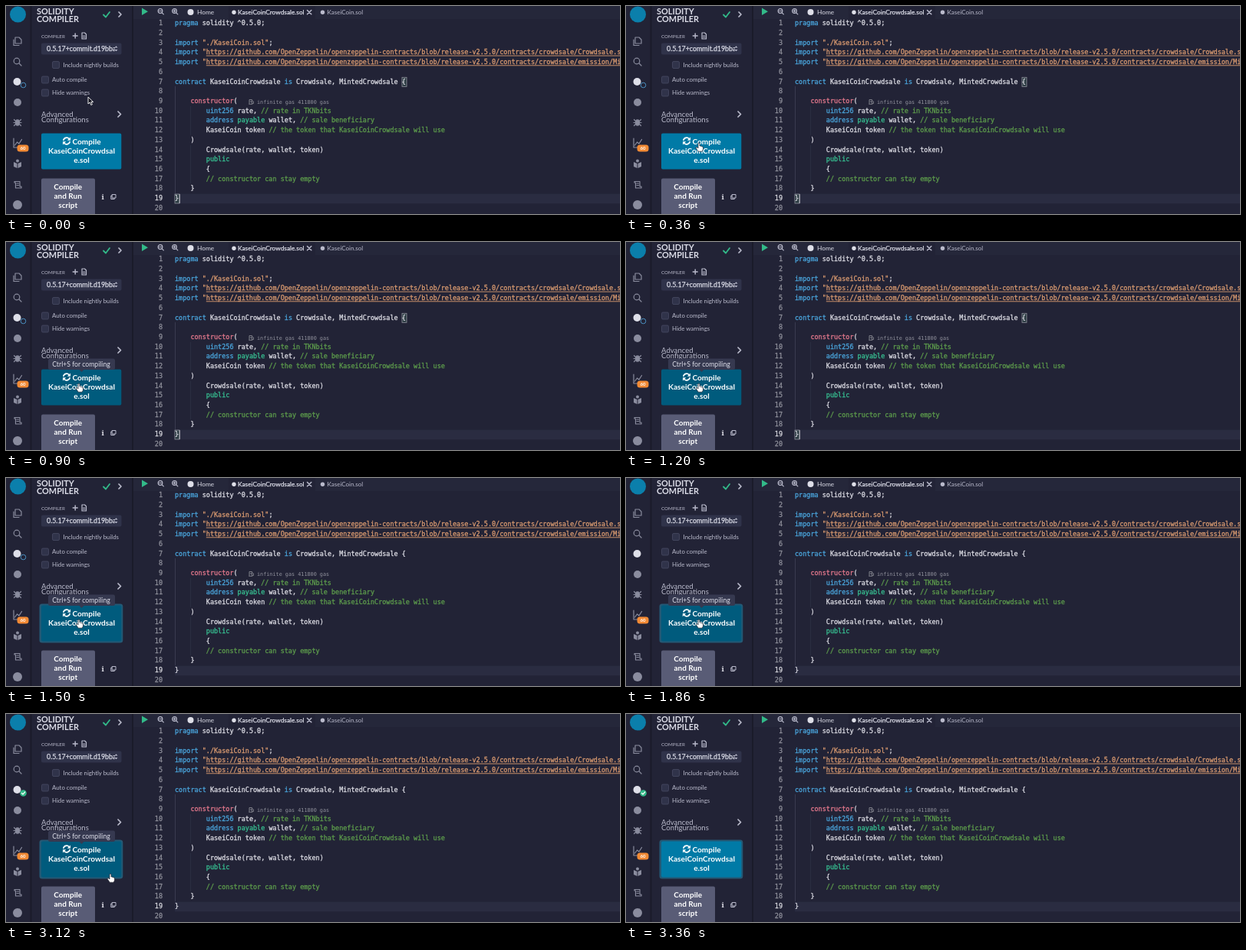
An HTML page for the animation above (3.42 s loop, 800x272 px).

```html
<!DOCTYPE html>
<html lang="en">
<head>
<meta charset="utf-8">
<title>Solidity compiler</title>
<style>
html, body { margin: 0; width: 100%; height: 100%; overflow: hidden; background: #222336; }
svg { display: block; width: 800px; height: 272px; }
text { font-family: Lato, sans-serif; fill: #babbcc; white-space: pre; }
.code text { font: 8.472px "DejaVu Sans Mono", monospace; fill: #dcdce4; stroke-width: .3; }
.line { fill: none; stroke: #babbcc; stroke-width: 1.2; stroke-linecap: round; stroke-linejoin: round; }
.dim { stroke: #8a8c9e; }
.bold { font-weight: 700; fill: #fff; text-anchor: middle; }
.title { font-weight: 700; font-size: 10.900px; fill: #dcdde8; }
.firm { fill: #dcdde8; stroke: #dcdde8; stroke-width: .25; }
</style>
</head>
<body>
<svg id="stage" viewBox="0 0 800 272">
  <rect width="800" height="272" fill="#222336"/>
  <rect x="165" width="635" height="17" fill="#25273a"/>
  <rect x="290" width="113" height="17" fill="#222336"/>
  <path d="M32.500 0V272M165 0V272" stroke="#1a1b2a" stroke-width="2"/>

  <g id="rail">
    <circle cx="15.500" cy="11" r="10.500" fill="#0b7fab"/>
    <g class="line dim">
      <path d="M12 44V41H17L20 44V49H12ZM10 44V51.500H17"/>
      <circle cx="14" cy="72" r="3.800"/><path d="M17 75L20 78"/>
      <path d="M10 173V185H21M11.500 182L14.500 178L17 180L20.500 174.500"/>
      <path d="M11 231V229.500H18V236H20V238H12.500V231ZM14 232H16.500M14 234.500H16.500"/>
      <ellipse cx="15" cy="152.500" rx="2.600" ry="3.600" fill="#8a8c9e"/>
      <path d="M10.500 148.500L12 150M19.500 148.500L18 150M10 152.500H20M10.500 156.500L12 155M19.500 156.500L18 155"/>
    </g>
    <path d="M10 204L14.500 206V212L10 210ZM20 204L15.500 206V212L20 210Z" fill="#8a8c9e"/>
    <circle cx="15" cy="202.500" r="2" fill="#8a8c9e"/>
    <circle cx="14.500" cy="99" r="5" fill="#dedfe8"/>
    <circle cx="15" cy="126" r="5" fill="#8a8c9e"/>
    <circle cx="15" cy="260" r="6" fill="#8a8c9e"/>
    <rect x="14.500" y="181.500" width="15" height="9" rx="3.500" fill="#f28a35"/>
    <text x="22" y="188.300" font-size="6" class="bold">60</text>
    <circle id="pending" cx="22.500" cy="103.500" r="3.300" fill="#222336" stroke="#4a8fc0"/>
    <g id="passed">
      <circle cx="22.500" cy="103.500" r="4.300" fill="#32ba89"/>
      <path d="M20.500 103.500L22 105L24.700 102" class="line" style="stroke:#fff"/>
    </g>
  </g>

  <g id="panel">
    <text x="40" y="10.700" class="title">SOLIDITY</text>
    <text x="40" y="21.200" class="title">COMPILER</text>
    <path d="M127 11.500L130 14.500L135 8" class="line" style="stroke:#32ba89;stroke-width:1.800"/>
    <path d="M147 8L150 11L147 14M146 138L149.500 141.500L146 145" class="line" style="stroke-width:1.700"/>
    <text x="46" y="42" font-size="6.200">COMPILER</text>
    <path d="M87.200 39H93.200M90.200 36V42" class="line" style="stroke-width:1.400"/>
    <path d="M99 35H102.500L104.500 37V43H99ZM100.500 39H103M100.500 41H103" class="line"/>
    <rect x="46" y="48.500" width="104.500" height="15" rx="2" fill="#30334a"/>
    <svg x="46" y="48" width="96" height="16"><text x="7" y="11" font-size="8.850" class="firm">0.5.17+commit.d19bbad</text></svg>
    <path d="M141.500 54.500L143.500 52.200L145.500 54.500ZM141.500 57L143.500 59.300L145.500 57Z" fill="#babbcc"/>
    <g fill="#30334a" stroke="#4c4f68" stroke-width=".7">
      <rect x="60.500" y="72.500" width="9" height="9" rx="1.500"/>
      <rect x="46.500" y="92" width="9" height="9" rx="1.500"/>
      <rect x="46.500" y="109" width="9" height="9" rx="1.500"/>
    </g>
    <g font-size="7.850">
      <text x="74.500" y="79.600">Include nightly builds</text>
      <text x="60" y="99.200">Auto compile</text>
      <text x="60" y="116.200">Hide warnings</text>
    </g>
    <g font-size="9.600">
      <text x="46" y="144.700">Advanced</text>
      <text x="46" y="151.500">Configurations</text>
    </g>
    <rect id="ring" x="43.500" y="164.500" width="108.800" height="51" rx="3.500" fill="#245975"/>
    <rect id="button" x="46" y="166.500" width="104.300" height="47" rx="2"/>
    <g id="spin">
      <g class="line" style="stroke:#fff;stroke-width:1.700;stroke-linecap:butt">
        <path d="M-4.200 -.7A4.200 4.200 0 0 1 3.200 -2.800M4.200 .7A4.200 4.200 0 0 1 -3.200 2.800"/>
      </g>
      <path d="M5 -5V-.8H.8ZM-5 5V.8H-.8Z" fill="#fff"/>
    </g>
    <g font-size="10.150">
      <text class="bold" x="105" y="180.800">Compile</text>
      <text class="bold" x="98.500" y="192.700">KaseiCoinCrowdsal</text>
      <text class="bold" x="98.500" y="204.700">e.sol</text>
    </g>
    <rect x="46" y="225.500" width="70" height="50" rx="2" fill="#595c76"/>
    <g font-size="10">
      <text class="bold" x="80.700" y="240">Compile</text>
      <text class="bold" x="80.700" y="252">and Run</text>
      <text class="bold" x="80.700" y="264">script</text>
    </g>
    <text x="124.600" y="252.600" font-size="9.500" style="font-family:'Noto Serif',serif;font-weight:700;fill:#e2e2ea">i</text>
    <path d="M138.500 246.500H143V251H138.500ZM138 248H136.800V252.500H141.300V251.500" class="line" style="stroke-width:1"/>
    <g id="tip">
      <path d="M95.500 167L98.500 170L101.500 167Z" fill="#363950"/>
      <rect x="55" y="152.500" width="87" height="14.500" rx="2.500" fill="#363950"/>
      <text x="98" y="162.500" text-anchor="middle" font-size="8.700" style="fill:#dcdde8">Ctrl+S for compiling</text>
    </g>
  </g>

  <g id="tabs" font-size="8.300">
    <path d="M177 2.500L185 7.200L177 12Z" fill="#32ba89"/>
    <g class="line">
      <circle cx="201" cy="6.500" r="2.800"/><path d="M203.300 8.800L205.300 10.800M199.700 6.500H202.300"/>
      <circle cx="219.500" cy="6.500" r="2.800"/><path d="M221.800 8.800L223.800 10.800M218.200 6.500H220.800M219.500 5.200V7.800"/>
    </g>
    <circle cx="240.500" cy="8" r="4" fill="#dedfe8"/>
    <text x="249" y="11.200" style="fill:#dcdde8">Home</text>
    <circle cx="297" cy="8.300" r="2.700" fill="#dedfe8"/>
    <text x="302" y="11.200" class="firm">KaseiCoinCrowdsale.sol</text>
    <path d="M392.500 5.500L397.800 10.800M397.800 5.500L392.500 10.800" class="line" style="stroke-width:1.500"/>
    <circle cx="412.500" cy="8.300" r="2.700" fill="#babbcc"/>
    <text x="418.500" y="11.200" font-size="8">KaseiCoin.sol</text>
  </g>

  <g class="code">
    <rect x="220" y="245.600" width="580" height="12.700" fill="#2a2c41"/>
    <path d="M220.500 105V245" stroke="#45475b" stroke-width=".7"/>
    <path d="M240.500 131V169M240.500 182V232" stroke="#323448" stroke-width=".6"/>
    <g id="match" fill="#2b3b42" stroke="#92939e" stroke-width=".8">
      <rect x="516" y="93.300" width="6" height="12"/>
      <rect x="220" y="246" width="6" height="12"/>
      <path d="M226.200 246V258" stroke="#d8d8dc"/>
    </g>
    <g id="lines"></g>
    <path d="M317 128V122.500H320.500V128M316.300 128.300H321.200M317.500 125H320M321 123.500L322.500 125V127.500H321.200" stroke="#85868f" fill="none" stroke-width=".9"/>
    <text x="327" y="127.600" style="font-size:6.800px;fill:#92939e">infinite gas 411800 gas</text>
  </g>

  <g id="arrow" fill="#151520" stroke="#fff" stroke-width=".9">
    <path d="M0 0V9L2.200 7L3.800 10.500L5.400 9.700L3.900 6.500H6.700Z"/>
  </g>
  <g id="hand" fill="#fff" stroke="#20202c" stroke-width=".7" stroke-linejoin="round">
    <path d="M-1 -4.500Q0 -5.700 1 -4.500V-1Q2 -1.700 2.600 -.6Q3.700 -1.200 4.200 0Q5.500 -.3 5.500 1V3Q5.300 5 4 6.200H-.8Q-2 4.200 -3.800 2Q-4 .3 -2.400 .8L-1 2Z"/>
  </g>
</svg>
<script>
const $ = id => document.getElementById(id);
const NS = "http://www.w3.org/2000/svg";
const LOOP = 3420, STEP = 60;
const CHAR = 5.1, LEFT = 220, PITCH = 12.72;
const colors = { k: "#4aa5dc", s: "#d99a70", c: "#5d9c4c", g: "#37bf91", p: "#e3788c", w: "#dcdce4" };

// "k~text|" marks a coloured run.
const repo = "https://github.com/OpenZeppelin/openzeppelin-contracts/blob/release-v2.5.0/contracts/crowdsale/";
const source = [
  "k~pragma|w~ solidity ^0.5.0;",
  "",
  'k~import|w~ |s~"./KaseiCoin.sol"|w~;',
  `k~import|w~ |s~"${repo}Crowdsale.sol"|w~;`,
  `k~import|w~ |s~"${repo}emission/MintedCrowdsale.sol"|w~;`,
  "",
  "k~contract|w~ KaseiCoinCrowdsale |k~is|w~ Crowdsale, MintedCrowdsale {",
  "",
  "w~    |p~constructor|w~(",
  "w~        |k~uint256|w~ rate, |c~// rate in TKNbits",
  "w~        |k~address|w~ |g~payable|w~ wallet, |c~// sale beneficiary",
  "w~        KaseiCoin token |c~// the token that KaseiCoinCrowdsale will use",
  "w~    )",
  "w~        Crowdsale(rate, wallet, token)",
  "w~        |g~public",
  "w~        {",
  "w~        |c~// constructor can stay empty",
  "w~    }",
  "w~}",
  ""
];

function add(tag, attrs) {
  const el = document.createElementNS(NS, tag);
  for (const key in attrs) el.setAttribute(key, attrs[key]);
  $("lines").append(el);
  return el;
}

function write(x, y, color, text, anchor = "start") {
  const style = `fill:${color};stroke:${color}`;
  add("text", { x, y, "text-anchor": anchor, style }).textContent = text;
}

source.forEach((line, i) => {
  const y = 25.2 + i * PITCH;
  write(204, y, i === 18 ? "#d5d5dc" : "#8d8e99", String(i + 1), "end");
  let col = 0;
  for (const run of line ? line.split("|") : []) {
    const color = colors[run[0]], text = run.slice(2), x = LEFT + col * CHAR;
    if (text.trim()) write(x, y, color, text);
    if (text.includes("://")) {
      add("path", { d: `M${x + CHAR} ${y + 1.7}h${(text.length - 2) * CHAR}`, stroke: color, "stroke-width": .9 });
    }
    col += text.length;
  }
});

const clamp = v => Math.min(1, Math.max(0, v));
const ease = v => v * v * (3 - 2 * v);
const show = (id, on) => $(id).setAttribute("opacity", Number(on));
const mix = (a, b, p) => `rgb(${a.map((v, i) => Math.round(v + (b[i] - v) * p))})`;

// Pointer stops: time, x, y
const stops = [[0, 107, 119], [60, 107, 119], [300, 95, 184], [420, 95, 184], [600, 95, 190],
  [2820, 95, 190], [3060, 136, 214], [3180, 136, 214], [3300, 152, 290], [LOOP, 152, 290]];

function pointer(t) {
  const i = stops.findIndex(s => s[0] > t);
  const [t0, x0, y0] = stops[i - 1], [t1, x1, y1] = stops[i];
  const p = ease((t - t0) / (t1 - t0));
  return [x0 + (x1 - x0) * p, y0 + (y1 - y0) * p];
}

const CLICK = 1260, START = 1840, DONE = 2640, LEAVE = 3240;

function draw(t) {
  const [x, y] = pointer(t);
  const over = y > 166 && y < 219;
  const at = `translate(${x} ${y})`;
  $("arrow").setAttribute("transform", at);
  $("hand").setAttribute("transform", at);
  show("arrow", !over);
  show("hand", over);

  const hover = clamp((t - 360) / 180) * (1 - clamp((t - LEAVE) / 120));
  $("button").setAttribute("fill", mix([0, 122, 166], [0, 91, 125], hover));
  show("tip", clamp((t - 480) / 180) * (1 - clamp((t - LEAVE) / 100)));
  show("ring", t >= CLICK);
  show("match", t < CLICK);

  const busy = t >= START && t < DONE;
  const turn = busy ? (t - START) * 0.18 : 0;
  $("spin").setAttribute("transform", `translate(79 176.500) rotate(${turn})`);
  show("pending", t < START);
  show("passed", t >= DONE);
}

const begin = performance.now();
function tick() {
  const t = (performance.now() - begin) % LOOP;
  draw(Math.floor(t / STEP) * STEP);
  requestAnimationFrame(tick);
}
tick();
</script>
</body>
</html>
```
